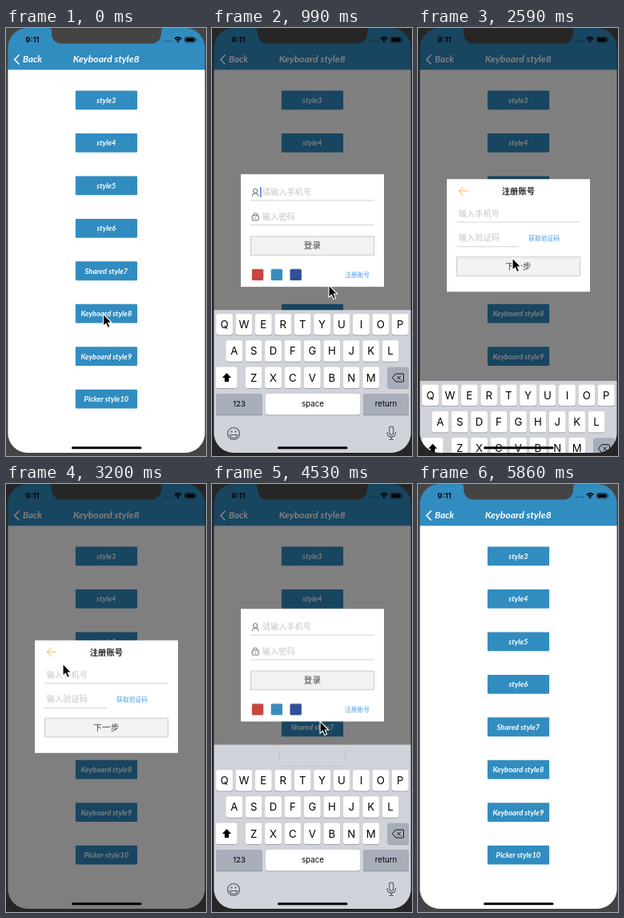
Write an HTML page that moves like this. It is 250x536 px and loops after 6040 ms.

```html
<!DOCTYPE html>
<html lang="zh">
<head>
<meta charset="utf-8">
<title>Keyboard style8</title>
<style>
html, body { margin: 0; width: 100%; height: 100%; overflow: hidden; background: #444; }
#stage { position: relative; width: 250px; height: 536px; overflow: hidden; }
svg { position: absolute; left: 0; top: 0; display: block; }
.card { position: absolute; left: 36px; top: 0; width: 178.6px; height: 140.6px; background: #fff; transform-origin: 50% 50%; }
.gill { font-family: Lato, sans-serif; font-style: italic; font-weight: 700; fill: #fff; }
.sf { font-family: Inter, sans-serif; }
.cjk { font-family: "Noto Sans CJK SC", "Noto Sans CJK", sans-serif; }
</style>
</head>
<body>
<div id="stage">
  <svg id="back" width="250" height="536"></svg>
  <div class="card" id="login"></div>
  <div class="card" id="signup"></div>
  <svg id="front" width="250" height="536"></svg>
</div>
<script>
const LOOP = 6040, STEP = 88.7, BLUE = '#318cc0';
const $ = id => document.getElementById(id);
const rect = (x, y, w, h, fill, extra = '') =>
  `<rect x="${x}" y="${y}" width="${w}" height="${h}" fill="${fill}" ${extra}/>`;
const path = (d, extra) => `<path d="${d}" fill="none" ${extra}/>`;
const text = (s, x, y, size, cls, extra = '') =>
  `<text x="${x}" y="${y}" font-size="${size}" class="${cls}" ${extra}>${s}</text>`;
const MID = 'text-anchor="middle"';

function buildBack() {
  const labels = ['style3', 'style4', 'style5', 'style6', 'Shared style7',
    'Keyboard style8', 'Keyboard style9', 'Picker style10'];
  const buttons = labels.map((s, i) => {
    const y = 78.5 + i * 53.46;
    return rect(86.9, y, 77.2, 23.8, BLUE, 'rx="1.2"') + text(s, 125.4, y + 15.3, 9.4, 'gill', MID);
  }).join('');
  $('back').innerHTML = rect(0, 0, 250, 536, '#fff') + rect(0, 0, 250, 52.3, BLUE) + buttons +
    path('M16.5 33.5L10.8 39.5L16.5 45.5', 'stroke="#fff" stroke-width="1.7"') +
    text('Back', 21, 43, 11.5, 'gill') +
    text('Keyboard style8', 125.2, 43, 12.2, 'gill', MID) +
    text('9:11', 24.3, 18.1, 9.6, 'sf', 'font-weight="600"') +
    path('M197 16.5H208', 'stroke="#154a68" stroke-width="1.2" stroke-dasharray="2 1"') +
    path('M210.8 13.6Q215 9.6 219.2 13.6M212.5 15.4Q215 13.1 217.5 15.4', 'stroke="#000" stroke-width="1.5"') +
    '<circle cx="215" cy="17" r="1.2"/>' +
    rect(223.5, 11.5, 13, 6.6, 'none', 'rx="1.8" stroke="#123" stroke-width=".7"') +
    rect(224.6, 12.6, 10.8, 4.4, '#000', 'rx=".9"') + rect(237.3, 13.8, 1, 2, '#123') +
    rect(82, 524.3, 87.5, 3, '#000', 'rx="1.5"') +
    rect(0, 0, 250, 536, '#000', 'id="dim"');
}

const line = (y, w = 155) => rect(11.5, y, w, 0.8, '#c6c6c6');
const hint = (s, x, y) => text(s, x, y, 10.25, 'cjk', 'fill="#c4c4c8"');
const link = (s, x, y) => text(s, x, y, 7.8, 'cjk', 'fill="#4299e6"');
const button = (s, y) => rect(12, y, 154, 23.4, '#f2f2f2', 'stroke="#bdbdbd" stroke-width=".8"') +
  text(s, 89, y + 15.5, 10.7, 'cjk', MID + ' fill="#3c3c3c"');
const card = body => '<svg width="178.6" height="140.6"><g transform="translate(.4 .3)">' + body + '</g>' +
  rect(0, 0, 179, 141, '#000', 'class="shade"') + '</svg>';
const caret = (x, y) => rect(x, y, 1.4, 13, '#426be0', 'class="caret"');

function buildCards() {
  const grey = 'stroke="#555" stroke-width=".9"';
  $('login').innerHTML = card(
    '<circle cx="17.8" cy="20.7" r="2.7" fill="none" ' + grey + '/>' +
    path('M13.8 27.5Q14 23.6 17.8 23.6Q21.6 23.6 21.8 27.5', grey) +
    rect(13.8, 51.5, 8, 6, 'none', 'rx="1" ' + grey) +
    path('M15.3 51.5V50.5Q15.3 48.6 17.8 48.6Q20.3 48.6 20.3 50.5V51.5M16.8 54.5H18.8', grey) +
    hint('请输入手机号', 26.3, 26.2) + line(32.2) + hint('输入密码', 26.3, 57) + line(63) +
    button('登录', 77.6) +
    ['#c8473f', '#3a8cbd', '#304f98'].map((c, i) => rect(13.5 + i * 23.8, 118.4, 14.4, 14.4, c, 'rx="1.5"')).join('') +
    link('注册账号', 129.5, 128.3) + caret(23.8, 15.6));
  $('signup').innerHTML = card(
    path('M26.5 14.5H15M20.2 9.2L14.8 14.5L20.2 19.8', 'id="arrow" stroke="#f2ad45" stroke-width="1"') +
    text('注册账号', 89, 18.3, 10.3, 'cjk', MID + ' font-weight="700" fill="#222"') +
    hint('输入手机号', 14.3, 46.4) + line(53.2) + hint('输入验证码', 14.3, 77.2) + line(83.8, 78) +
    link('获取验证码', 101.7, 76.4) + button('下一步', 97.4) + caret(14.6, 37.5));
}

function key(x, y, w, fill) {
  return rect(x, y + 0.8, w, 26.4, '#8b8f97', 'rx="2.8"') + rect(x, y, w, 26.4, fill, 'rx="2.8"');
}

function keyboard() {
  const grey = '#a8aeb9', ink = 'stroke="#111" stroke-width="1"', soft = 'stroke="#50555c" stroke-width="1.1"';
  const row = (s, x, y) => [...s].map((c, i) => {
    const cx = x + i * 24.42;
    return key(cx - 10.4, y, 20.8, '#fff') + text(c, cx, y + 18, 13.2, 'sf', MID);
  }).join('');
  const word = (s, x) => text(s, x, 474.3, 9.6, 'sf', MID);
  return rect(0, 353.2, 250, 190, '#d0d3d9') +
    '<g id="bar">' + rect(0, 326.5, 250, 27, '#d0d3d9') +
    rect(84, 333, 0.8, 14, '#b9bdc4') + rect(166, 333, 0.8, 14, '#b9bdc4') + '</g>' +
    row('QWERTYUIOP', 15.5, 358) + row('ASDFGHJKL', 27.7, 391.3) + row('ZXCVBNM', 52.1, 424.6) +
    key(5, 424.6, 26.6, '#fff') + key(219.4, 424.6, 26.6, grey) +
    '<path d="M18.4 432L24 438H21V443H15.8V438H12.8Z"/>' +
    path('M229.5 433H238.5Q239.5 433 239.5 434V442Q239.5 443 238.5 443H229.5L225.5 438ZM231.3 435.8L235.8 440.3M235.8 435.8L231.3 440.3', ink) +
    key(5, 458, 58, grey) + key(67, 458, 118, '#fff') + key(189, 458, 57, grey) +
    word('123', 34) + word('space', 126) + word('return', 217.5) +
    '<circle cx="27" cy="508" r="7.5" fill="none" ' + soft + '/>' +
    path('M22.3 509.5H31.7Q31 513.5 27 513.5Q23 513.5 22.3 509.5Z', soft) +
    '<circle cx="24.5" cy="505.5" r="1.1" fill="#50555c"/><circle cx="29.5" cy="505.5" r="1.1" fill="#50555c"/>' +
    rect(221.7, 499, 5, 10.5, 'none', 'rx="2.5" ' + soft) +
    path('M219 506V507.5Q219 512 224.2 512Q229.4 512 229.4 507.5V506M224.2 512V515.5M221.5 515.5H227', soft);
}

function buildFront() {
  const screen = 'M27 0H53Q57 0 57 4V7A12.5 12.5 0 0 0 69.5 19.6H181.5A12.5 12.5 0 0 0 194 7V4Q194 0 198 0' +
    'H224A24.6 24.6 0 0 1 248.6 24.6V507.3A24.6 24.6 0 0 1 224 531.9H27A24.6 24.6 0 0 1 2.4 507.3V24.6A24.6 24.6 0 0 1 27 0Z';
  $('front').innerHTML = '<g id="keys">' + keyboard() + '</g>' +
    '<g id="home">' + rect(82, 524.3, 87.5, 3, '#000', 'rx="1.5"') + '</g>' +
    `<path id="bezel" fill-rule="evenodd" d="M0 0H250V536H0Z${screen}"/>` +
    '<path id="cursor" d="M.6 1.4V14L3.7 11.2L6.1 16.8L7.8 16L5.4 10.4H9.4Z" stroke="#fff" stroke-width="2.2" paint-order="stroke"/>';
}

const clamp = v => Math.max(0, Math.min(1, v));
const ease = u => (1 - Math.cos(Math.PI * clamp(u))) / 2;
const ramp = (t, start, len = 420) => ease((t - start) / len);
const lerp = (a, b, p) => a + (b - a) * p;

// time, x, y of the pointer tip
const track = [
  [0, 121.5, 358], [700, 121.5, 358], [979, 146, 322], [1070, 168, 310], [1170, 181, 308], [1350, 184, 309],
  [1690, 184, 309], [1869, 164, 308], [2050, 155, 304], [2230, 118, 288], [2700, 118, 288],
  [3030, 92, 246], [3204, 71, 225], [3380, 59.5, 210], [4100, 59.5, 210], [4360, 112, 268],
  [4539, 135, 297], [4640, 140, 309], [LOOP, 140, 309]
];

function pointer(t) {
  const i = Math.max(1, track.findIndex(k => k[0] >= t));
  const [a, b] = [track[i - 1], track[i]], p = clamp((t - a[0]) / (b[0] - a[0]));
  return [lerp(a[1], b[1], p), lerp(a[2], b[2], p)];
}

const CLOSE = 4780;

function draw(ms) {
  const t = Math.floor((ms % LOOP) / STEP) * 89;
  const open = ramp(t, 510), close = ramp(t, CLOSE, 500);
  const shown = open - close;

  // the second keyboard rise brings a suggestion bar
  const second = t > 3600;
  const up = second ? ramp(t, 3716) - close : open - ramp(t, 2375);
  const tall = second ? 209.5 : 183;
  const top = lerp(195.8, second ? 156.4 : 183.1, up);

  const flip = second ? ramp(t, 3716) : ramp(t, 1499);
  const past = flip >= 0.5;
  const angle = 180 * flip - (past ? 180 : 0);
  const sin = Math.abs(Math.sin(angle * Math.PI / 180));
  const front = second === past ? 'login' : 'signup';
  for (const id of ['login', 'signup']) {
    const el = $(id);
    el.style.visibility = id === front && shown > 0.001 ? 'visible' : 'hidden';
    el.style.opacity = shown;
    el.style.transform = `translateY(${top}px) perspective(450px) translateZ(${-89 * sin}px) rotateY(${angle}deg)`;
    el.querySelector('.shade').setAttribute('opacity', 0.5 * sin);
  }

  const caretOn = front === 'login' ? (t < 1240 || (t > 3700 && t < 4400)) : t < 2375;
  $(front).querySelector('.caret').setAttribute('opacity', caretOn ? 1 : 0);
  $('arrow').setAttribute('opacity', t >= 3555 && t < 3730 ? 0.4 : 1);

  $('dim').setAttribute('opacity', 0.5 * shown);
  $('keys').setAttribute('transform', `translate(0 ${(1 - up) * tall})`);
  $('keys').setAttribute('visibility', up > 0.001 ? 'visible' : 'hidden');
  $('home').setAttribute('visibility', up > 0.06 ? 'visible' : 'hidden');
  $('bar').setAttribute('visibility', second && up > 0.001 ? 'visible' : 'hidden');

  const active = t >= 356 && t < 5860;
  $('bezel').setAttribute('fill', active ? '#262626' : '#444');
  const [x, y] = pointer(t);
  $('cursor').setAttribute('transform', `translate(${x} ${y})`);
  $('cursor').setAttribute('visibility', t < 5860 ? 'visible' : 'hidden');
}

buildBack();
buildCards();
buildFront();
const start = performance.now();
function tick() {
  draw(performance.now() - start);
  requestAnimationFrame(tick);
}
draw(0);
requestAnimationFrame(tick);
</script>
</body>
</html>
```
